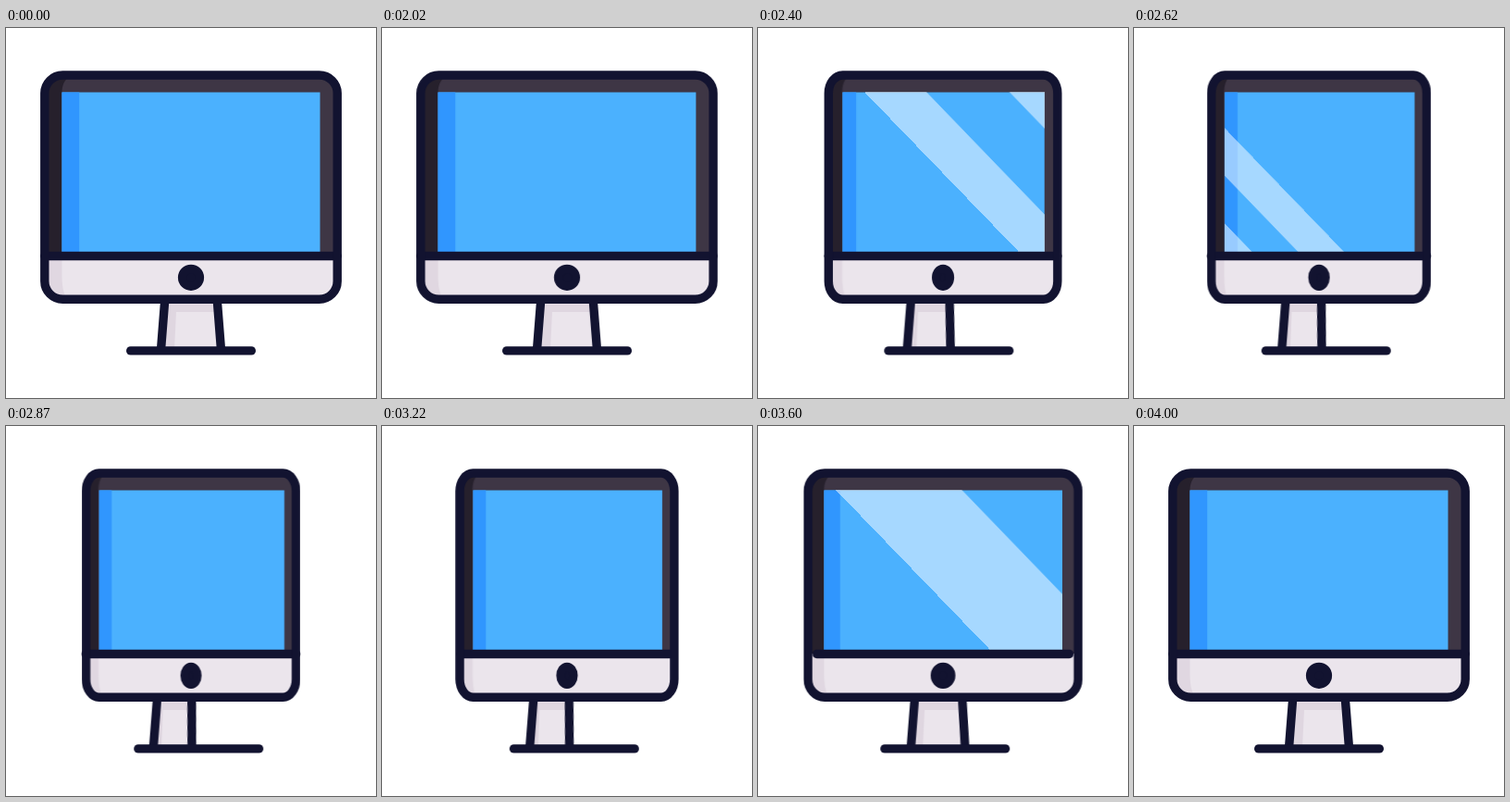
An HTML page that plays this animation: 400x400 px, repeating every 4020 ms.

```html
<!DOCTYPE html>
<html lang="en">
<head>
<meta charset="utf-8">
<title>Turning monitor</title>
<style>
html, body { margin: 0; width: 100%; height: 100%; overflow: hidden; background: #fff; }
svg { display: block; width: 100%; height: 100%; }

.line { fill: none; stroke: #121330; stroke-width: 9.4; stroke-linecap: round; vector-effect: non-scaling-stroke; }

/* Each part swings between rest and its own --turned pose */
.turn { animation: turn 4020ms infinite; }
.bar { animation-name: turn-late; }
.body { --turned: scaleX(.7157); transform-origin: 200px 0; }
.screen { --turned: translateX(.85px) scaleX(.7157); transform-origin: 200px 0; }
.foot { --turned: translateX(8.3px); }
.leg-left { --turned: translateX(-8.35px); }
.leg-right { --turned: translateX(-5.18px) skewX(-4.375deg); }
.stand { --turned: translateX(51.9px) scaleX(.65); }
.stand-light { --turned: translateX(40.65px) scaleX(.7); }

@keyframes turn {
  0%, 49.75% { transform: none; animation-timing-function: cubic-bezier(.3, 0, .04, 1); }
  74.63% { transform: var(--turned); animation-timing-function: cubic-bezier(.6, 0, .4, 1); }
  99.5%, 100% { transform: none; }
}
@keyframes turn-late {
  0%, 49.75% { transform: none; animation-timing-function: cubic-bezier(.3, 0, .04, 1); }
  74.63% { transform: var(--turned); animation-timing-function: cubic-bezier(.75, 0, .5, 1); }
  99.5%, 100% { transform: none; }
}

/* The glare sweeps left while shrinking, then back right while growing */
.glare { fill: #fff; fill-opacity: .5; animation: sweep 4020ms linear infinite; }
@keyframes sweep {
  0%, 53.18% { transform: translateX(345px) scaleX(1.529); }
  69.15% { transform: translateX(-213.6px) scaleX(.232); }
  80.1% { transform: translateX(-246.6px) scaleX(.548); }
  97.01%, 100% { transform: translateX(345px) scaleX(3.2); }
}
</style>
</head>
<body>
<svg viewBox="0 0 400 400">
  <defs>
    <clipPath id="case"><rect x="41.8" y="51" width="316.4" height="242.2" rx="19.5"/></clipPath>
    <clipPath id="glass"><rect class="turn screen" x="60.5" y="69.5" width="279" height="173"/></clipPath>
  </defs>

  <!-- stand -->
  <path class="turn stand" fill="#dfd6e0" d="M171.5 295H228.5L232.5 348H167.5Z"/>
  <path class="turn stand-light" fill="#ebe5ec" d="M184 307H229L232 348H182Z"/>
  <path class="turn leg-left line" d="M171.5 297L167.5 348"/>
  <path class="turn leg-right line" d="M228.5 297L232.5 348"/>
  <path class="turn foot line" d="M134.7 348.9H265.3"/>

  <!-- case -->
  <g class="turn body">
    <g clip-path="url(#case)">
      <rect x="40" y="50" width="320" height="197" fill="#3e3645"/>
      <path fill="#26202c" d="M40 50H72C63 55 60.5 62 60.5 70V247H40Z"/>
      <rect x="40" y="246" width="320" height="50" fill="#ebe5ec"/>
      <path fill="#e0d7e1" d="M40 246H60.5V268C60.5 278 62 287 66 294H40Z"/>
    </g>
  </g>

  <!-- screen -->
  <g class="turn screen">
    <rect x="60.5" y="69.5" width="279" height="173" fill="#4bb1fe"/>
    <rect x="60.5" y="69.5" width="18.7" height="173" fill="#3096fe"/>
  </g>
  <g clip-path="url(#glass)">
    <g transform="translate(0 70) skewX(43.98)">
      <g class="glare">
        <rect y="-2" width="67" height="178"/>
        <rect x="157" y="-2" width="90" height="178"/>
      </g>
    </g>
  </g>

  <!-- outlines -->
  <path class="turn body bar line" d="M41.8 246.5H358.2"/>
  <g class="turn body">
    <rect class="line" x="41.8" y="51" width="316.4" height="242.2" rx="19.5"/>
    <circle class="line" style="fill:#121330" cx="200" cy="269.8" r="9.4"/>
  </g>
</svg>
</body>
</html>
```
